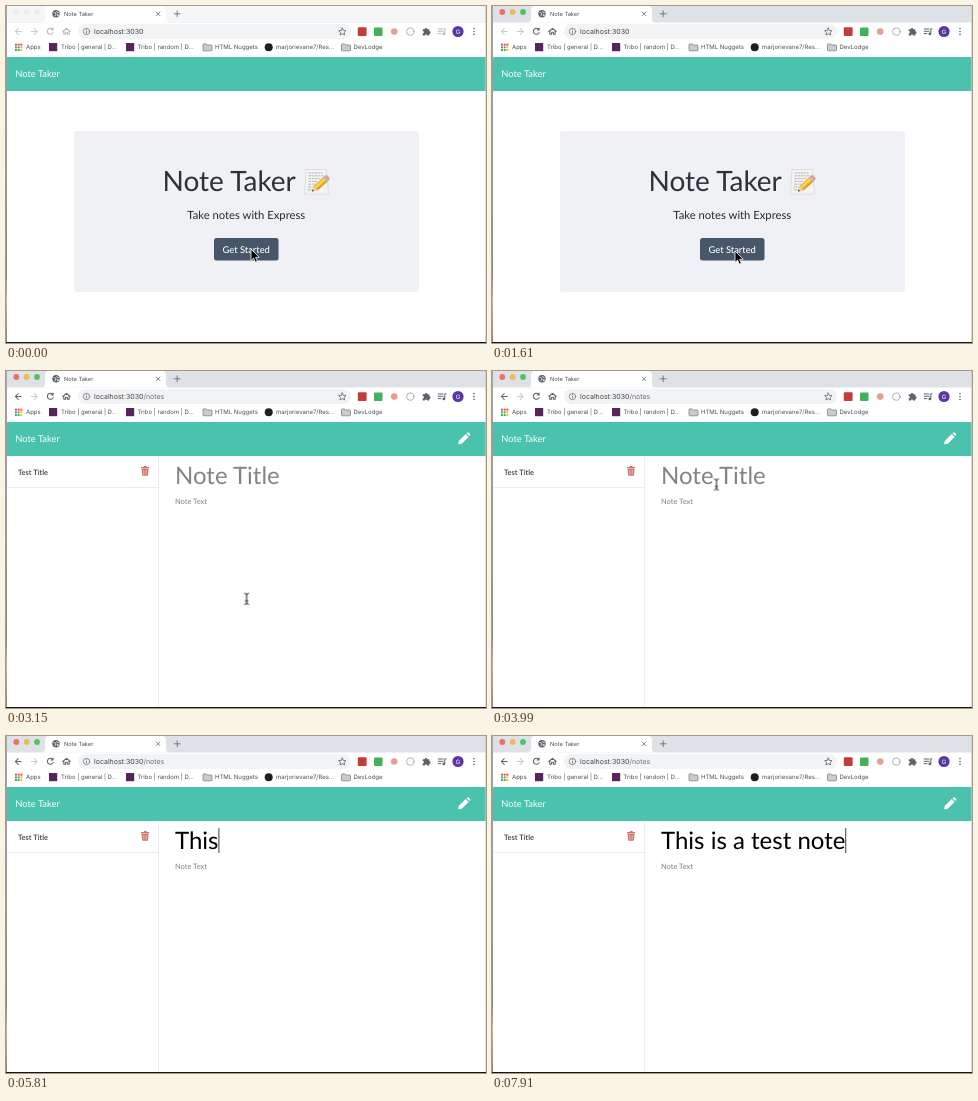
These frames come from a looping animation (480 by 337 pixels, 8 s). An HTML page:

```html
<!DOCTYPE html>
<html lang="en">
<head>
<meta charset="utf-8">
<title>Note Taker</title>
<style>
  html, body { margin: 0; width: 100%; height: 100%; overflow: hidden; background: #fff; }
  svg { display: block; width: 480px; height: 337px; }
  text { font-family: Lato, sans-serif; text-rendering: geometricPrecision; white-space: pre; }
  .ui text { font: 6px Inter, sans-serif; fill: #494d52; }
  .ui .url { font-size: 7px; fill: #404448; }
  .ui .route { fill: #6d7175; }
  .ui .tab { font-size: 5.7px; }
  .line { fill: none; stroke: #5f6368; stroke-linecap: round; stroke-linejoin: round; }

  .anim { animation: 8s step-end infinite; }
  #home { animation-name: home; }
  .notes { animation-name: notes; }
  .clicked { animation-name: clicked; }
  .loading { animation-name: loading; }
  .settled { animation-name: settled; }
  .asleep { animation-name: asleep; }
  .wake { animation-name: wake; }
  .back { animation-name: back; }
  .arrow { animation-name: arrow; }
  .hand { animation-name: hand; }
  .beam { animation-name: beam; }
  #pointer { animation: move 8s ease-in-out infinite; }

  @keyframes home { 0% { opacity: 1 } 33.25%, to { opacity: 0 } }
  @keyframes notes { 0% { opacity: 0 } 33.25%, to { opacity: 1 } }
  @keyframes clicked { 0% { opacity: 0 } 31.5%, to { opacity: 1 } }
  @keyframes loading { 0% { opacity: 0 } 31.5% { opacity: 1 } 34.125%, to { opacity: 0 } }
  @keyframes settled { 0% { opacity: 1 } 31.5% { opacity: 0 } 34.125%, to { opacity: 1 } }
  @keyframes asleep { 0% { opacity: 1 } 19.25%, to { opacity: 0 } }
  @keyframes wake { 0% { opacity: .45 } 19.25%, to { opacity: 1 } }
  @keyframes back { 0% { opacity: .35 } 31.5%, to { opacity: 1 } }
  @keyframes arrow { 0% { opacity: 1 } 21.875%, to { opacity: 0 } }
  @keyframes hand { 0% { opacity: 0 } 21.875% { opacity: 1 } 37.625%, to { opacity: 0 } }
  @keyframes beam { 0% { opacity: 0 } 37.625% { opacity: 1 } 67.375%, to { opacity: 0 } }
  @keyframes move {
    0%, .875% { transform: translate(245px, 243px) }
    9.625%, 11.375% { transform: translate(245px, 226px) }
    19%, 37.625% { transform: translate(243px, 245px) }
    44.625%, to { transform: translate(224.5px, 113.5px) }
  }
</style>
</head>
<body>
<svg viewBox="0 0 480 337">
  <defs>
    <linearGradient id="desk" x2="0" y2="1">
      <stop offset="0" stop-color="#a4a8ad"/>
      <stop offset=".8" stop-color="#8d8b8a"/>
      <stop offset=".87" stop-color="#d2b287"/>
      <stop offset="1" stop-color="#9a8068"/>
    </linearGradient>
    <path id="folder" d="M0 1.2q0-.8.8-.8h2.4l1 1.1h4q.8 0 .8.8v4.200q0 .8-.8.8H.8q-.8 0-.8-.8z" fill="#c9cbce" stroke="#74787d" stroke-width=".7"/>
    <path id="ibeam" d="M-2-5.500q2 0 2 1.300v8.400q0 1.300-2 1.300M2-5.500q-2 0-2 1.300m0 8.400q0 1.300 2 1.300M-1.200 2h2.400"/>
  </defs>

  <rect width="480" height="337" fill="#fff"/>

  <g class="ui">
    <rect width="480" height="16.500" fill="#dee1e6"/>
    <g class="anim wake">
      <circle cx="10.300" cy="6" r="2.900" fill="#ee6f66"/>
      <circle cx="20.700" cy="6" r="2.900" fill="#ebbb58"/>
      <circle cx="31" cy="6" r="2.900" fill="#55c062"/>
    </g>
    <g class="anim asleep">
      <rect width="480" height="16.500" fill="#f5f6f7"/>
      <g fill="#ececee"><circle cx="10.300" cy="6" r="2.900"/><circle cx="20.700" cy="6" r="2.900"/><circle cx="31" cy="6" r="2.900"/></g>
    </g>
    <path d="M35 16.500q4 0 4-4V4q0-4 4-4h113q4 0 4 4v8.500q0 4 4 4z" fill="#fff"/>

    <g class="anim settled">
      <circle cx="50" cy="7.700" r="3.700" fill="#5b6067"/>
      <path d="M47.400 6.500l2 .3.700 1.500-1.200.7.300 1.300M50.600 5l.4 1.300 1.800.3M51 8.600l1.600.2-.8 1.300z" fill="none" stroke="#fff" stroke-width=".7"/>
      <text class="tab" x="58" y="9.800">Note Taker</text>
    </g>
    <g class="anim loading">
      <path d="M46.800 7a3.300 3.300 0 0 1 3-2.800" class="line" stroke-width=".7" opacity=".5"/>
      <text class="tab" x="58" y="9.800" opacity=".75">localhost:3030/notes</text>
    </g>
    <path class="line" stroke-width=".8" d="M150.300 6l3.600 3.600m0-3.600l-3.600 3.600M168.200 7.800h6m-3-3v6"/>

    <g class="line" stroke-width="1.050">
      <path class="anim back" d="M15.200 25.500H9.300m2.900-2.900l-2.900 2.900 2.900 2.900"/>
      <path opacity=".35" d="M25.300 25.500h5.900m-2.900-2.900l2.900 2.900-2.900 2.900"/>
      <g class="anim settled">
        <path class="anim wake" d="M46.700 23.400a3 3 0 1 0 .5 3M47.100 21.900v2h-2"/>
      </g>
      <path class="anim loading" d="M41.600 22.700l5.400 5.400m0-5.400l-5.400 5.400"/>
      <path class="anim wake" d="M56.800 25.500l3.700-3.200 3.700 3.200m-6.400-.4v3.200h1.800v-2h1.800v2h1.800v-3.200"/>
    </g>

    <rect x="72" y="18" width="273" height="15" rx="7.500" fill="#f1f3f4"/>
    <circle class="line" cx="80.500" cy="25.500" r="3.200" stroke-width=".7"/>
    <path class="line" stroke-width=".8" d="M80.500 25.300v1.700m0-3.300v.1"/>
    <text class="url" x="88" y="27.900">localhost:3030</text>
    <g class="anim clicked">
      <text class="url route" x="88" y="27.900"><tspan fill="none">localhost:3030</tspan>/notes</text>
    </g>
    <path class="line" stroke-width=".8" d="M336.300 22l1.100 2.400 2.600.3-1.900 1.800.5 2.500-2.300-1.300-2.300 1.300.5-2.500-1.900-1.800 2.600-.3z"/>

    <rect x="351.800" y="21.200" width="8.800" height="8.800" rx="1" fill="#c43c3a"/>
    <rect x="368" y="21.400" width="8.500" height="8.500" rx="1" fill="#43b05c"/>
    <circle cx="388.200" cy="25.600" r="3.300" fill="#e3a093"/>
    <circle class="line" cx="404.300" cy="25.600" r="3.700" stroke-width=".8" style="stroke:#9a9da1"/>
    <path d="M416.700 23.200h2a1.300 1.300 0 1 1 2.600 0h2v2.100a1.300 1.300 0 1 1 0 2.600v1.700h-2.100a1.200 1.200 0 1 0-2.400 0h-2.100v-2.100a1.200 1.200 0 1 0 0-2.400z" fill="#5f6368"/>
    <g class="anim wake">
      <path class="line" stroke-width="1" d="M432.200 23h4.800m-4.800 2.300h4.800m-4.800 2.300h2.800m3.800.200v-5h1.200"/>
      <circle cx="437.800" cy="27.900" r="1.300" fill="#5f6368"/>
    </g>
    <circle cx="452" cy="25.500" r="5.600" fill="#5a35a5"/>
    <text x="452" y="27.600" text-anchor="middle" style="fill:#fff">G</text>
    <g fill="#5f6368"><circle cx="468" cy="22.600" r=".8"/><circle cx="468" cy="25.500" r=".8"/><circle cx="468" cy="28.400" r=".8"/></g>

    <g id="apps"></g>
    <text x="20" y="43.400">Apps</text>
    <rect x="43" y="37" width="8.200" height="8.200" fill="#58245c"/>
    <text x="55" y="43.400">Tribo | general | D...</text>
    <rect x="120" y="37" width="8.200" height="8.200" fill="#58245c"/>
    <text x="131.500" y="43.400">Tribo | random | D...</text>
    <use href="#folder" x="197" y="37.500"/>
    <text x="209" y="43.400">HTML Nuggets</text>
    <circle cx="262.700" cy="41.200" r="4" fill="#1d1f22"/>
    <text x="270" y="43.400">marjorievane7/Res...</text>
    <use href="#folder" x="335.500" y="37.500"/>
    <text x="347.500" y="43.400">DevLodge</text>
  </g>

  <rect y="51" width="480" height="34" fill="#4bc2ad"/>
  <text x="9.300" y="71.400" font-size="9.375" fill="#fff">Note Taker</text>

  <g id="home" class="anim">
    <rect x="68" y="125" width="345" height="161" rx="3" fill="#f0f1f5"/>
    <text x="156.500" y="185" font-size="28" fill="#2d3238">Note Taker</text>
    <g transform="translate(298.500 162.500)">
      <path d="M1.500 1h20.500l2 24.500H0z" fill="#f4f4f2" stroke="#d0d1d2" stroke-width=".6"/>
      <path d="M4 4.500h14M4 7.300h15M3.800 10.100h13M3.600 12.900h9M3.500 15.700h8M3.300 18.500h5M3.200 21.300h7" stroke="#a6a9ad" stroke-width=".8" stroke-dasharray="3 .7 1.800 .6"/>
      <path d="M7.500 23l1.700-5.600L19.500 8l4.300 4.400-10.500 9.300z" fill="#f2b632"/>
      <path d="M10.900 18.900L21.300 9.600" stroke="#ffd968" stroke-width="1.500"/>
      <path d="M12.300 21.600l10.300-9.200" stroke="#c9861f" stroke-width="1"/>
      <path d="M7.500 23l1.700-5.600 4.100 4.300z" fill="#edcf9f"/>
      <path d="M7.500 23l.6-2 1.400 1.400z" fill="#333"/>
      <path d="M18.200 9.200l1.400-1.300 4.300 4.400-1.400 1.300z" fill="#b9bdc2"/>
      <path d="M19.600 7.900l1.300-1.100q1.200-.7 2.500.7l1.300 1.500q1 1.300 0 2.300l-.8 1z" fill="#d8a08c"/>
    </g>
    <text x="240.300" y="213" font-size="11.250" fill="#24292e" text-anchor="middle">Take notes with Express</text>
    <rect x="208" y="232" width="64.500" height="22.500" rx="2.500" fill="#48566a"/>
    <rect class="anim clicked" x="207.600" y="231.400" width="65.300" height="23.500" rx="3" fill="#2c394a" stroke="#8d96a2" stroke-width="1.600"/>
    <text x="240.200" y="246.500" font-size="9.375" font-weight="500" fill="#fff" text-anchor="middle">Get Started</text>
  </g>

  <g class="anim notes">
    <path d="M452.200 73.300l.5-3.200 7-7 2.800 2.800-7 7zM460.500 62.300l.9-.8q.7-.5 1.300 0l1.400 1.500q.5.700 0 1.300l-.8.800z" fill="#fff"/>
    <path d="M152.500 85V336M1 116.500h151.500" stroke="#e8e9eb" stroke-width=".8"/>
    <text x="12" y="104" font-size="7.500" font-weight="600" fill="#3a3e42">Test Title</text>
    <path d="M135 96h2.500l.6-.9h2.200l.6.900h2.200v1.200H135zM135.600 97.800h6.900l-.5 6.200q-.1.800-.9.800h-4q-.8 0-.9-.8z" fill="#d0706b"/>
    <path d="M137.500 99v4.600m1.550-4.600v4.600m1.550-4.600v4.600" stroke="#f0d0cd" stroke-width=".6"/>
    <text id="hint" x="169" y="113" font-size="24" fill="#828587">Note Title</text>
    <text id="typed" x="169" y="113" font-size="24" fill="#000"></text>
    <rect id="caret" y="92" width=".8" height="25" fill="#111"/>
    <text x="169" y="132.700" font-size="7.500" fill="#7b7f82">Note Text</text>
  </g>

  <rect width="1" height="337" fill="url(#desk)"/>
  <rect x="479.300" width=".7" height="337" fill="#c6c9cc"/>
  <rect y="336" width="480" height="1" fill="#151515"/>

  <g id="pointer">
    <path class="anim arrow" d="M0 0v11.500l2.600-2.400 1.800 4.100 2-.9-1.800-4h3.600z" fill="#000" stroke="#fff" stroke-width=".8"/>
    <path class="anim hand" d="M-.9.500q.2-1 1.100-1t1.100 1.100v3.600q.4-.7 1.200-.5.700.2.800.9.500-.5 1.200-.2.600.3.700 1 .8-.5 1.400.1.400.4.300 1.200v1.800q-.1 1.200-1 2.300v1.300H.8v-1.200Q-.9 9-2.400 6.600q-.5-1 .3-1.400.700-.3 1.200.5z" fill="#000" stroke="#fff" stroke-width=".8"/>
    <g class="anim beam" fill="none" stroke-linecap="round">
      <use href="#ibeam" stroke="#fff" stroke-width="2"/>
      <use href="#ibeam" stroke="#111" stroke-width=".9"/>
    </g>
  </g>
</svg>
<script>
  const $ = id => document.getElementById(id);
  const LOOP = 8000, FOCUS = 4200, BLINK = 500, LEFT = 169;
  const note = 'This is a test note';
  const keys = [5390, 5530, 5670, 5770, 5950, 6160, 6230, 6300, 6440, 6510,
                6650, 6720, 6860, 6930, 7070, 7420, 7560, 7700, 7840];

  const dots = ['#ea4335', '#ea4335', '#ea4335', '#34a853', '#4285f4', '#fbbc05', '#34a853', '#34a853', '#fbbc05'];
  $('apps').innerHTML = dots.map((c, i) =>
    `<rect x="${9 + i % 3 * 2.7}" y="${37.7 + (i / 3 | 0) * 2.7}" width="1.9" height="1.9" fill="${c}"/>`).join('');

  // Typing follows the clock of the CSS animations
  const clock = $('pointer').getAnimations()[0];

  function draw() {
    const t = (clock.currentTime || 0) % LOOP;
    const count = keys.filter(k => k <= t).length;
    const since = t - (count ? keys[count - 1] : FOCUS);
    $('typed').textContent = note.slice(0, count);
    $('hint').style.opacity = count ? 0 : 1;
    $('caret').setAttribute('x', LEFT + (count ? $('typed').getComputedTextLength() : 0));
    $('caret').style.opacity = since >= 0 && Math.floor(since / BLINK) % 2 === 0 ? 1 : 0;
    requestAnimationFrame(draw);
  }
  draw();
</script>
</body>
</html>
```
